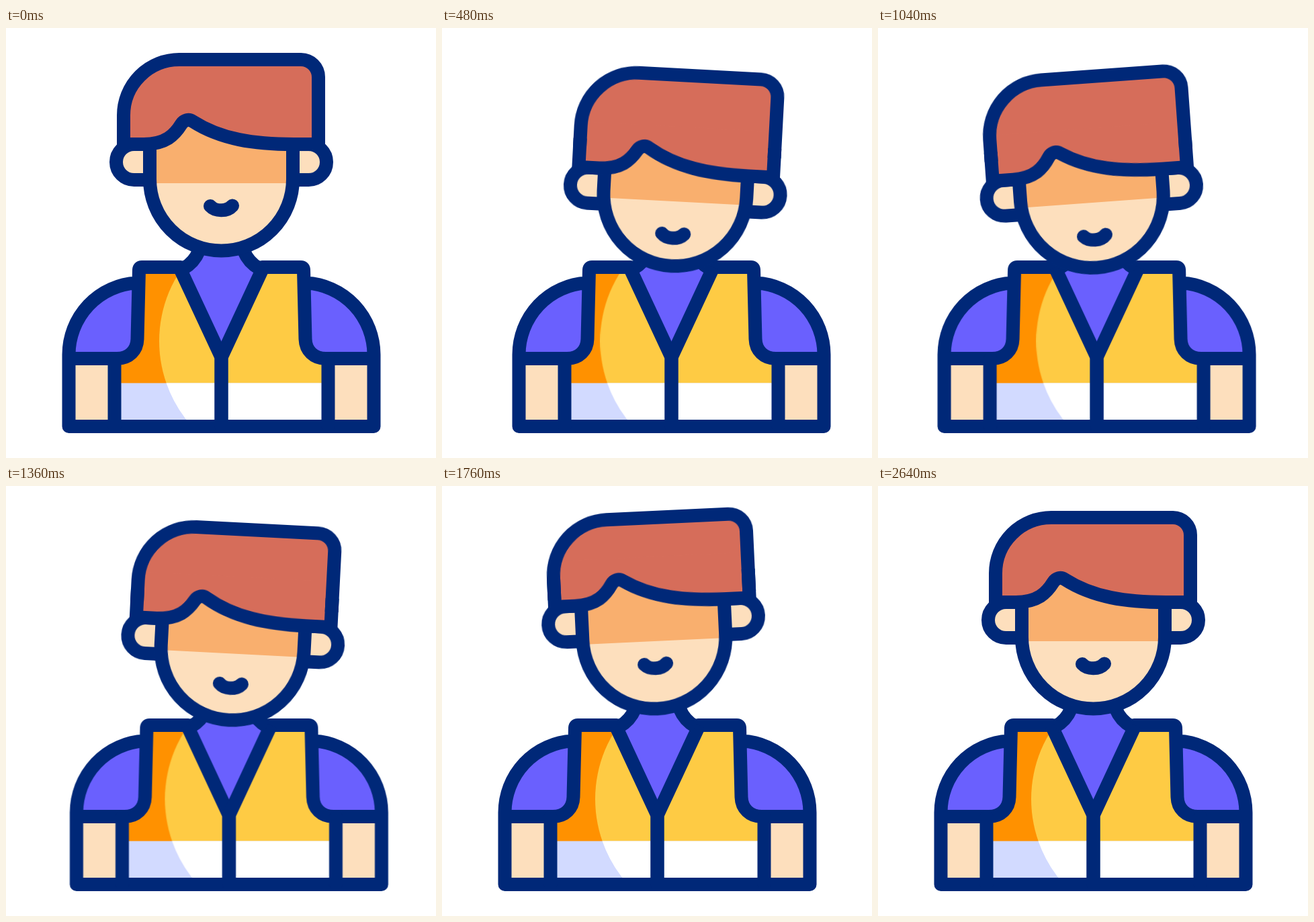
An HTML page that plays this animation: 640x640 px, repeating every 3.04 s.

```html
<!DOCTYPE html>
<html lang="en">
<head>
<meta charset="utf-8">
<title>Nodding worker</title>
<style>
  html, body { margin: 0; width: 100%; height: 100%; overflow: hidden; background: #fff; }
  svg { display: block; width: 100%; height: 100%; }

  .line { fill: none; stroke: #002878; stroke-width: 20; }
  .round { stroke-linejoin: round; stroke-linecap: round; }
  .skin { fill: #fddfbd; }
  .tan { fill: #f9af6e; }
  .hair { fill: #d66d5a; }
  .shirt { fill: #6a60fe; }
  .yellow { fill: #fecb44; }
  .orange { fill: #ff9100; }
  .lilac { fill: #d2daff; }
  .white { fill: #fff; }

  .sway, .still, .nod, .tilt, .dip, .shade, .glow {
    animation: 3040ms cubic-bezier(.333, 0, .667, 1) infinite;
  }
  .sway { --k: 1px; animation-name: sway; }
  .still { --k: -1px; animation-name: sway; }
  .nod { animation-name: nod; }
  .dip { animation-name: dip; }
  .tilt { animation-name: tilt; transform-origin: 320.5px 326px; }
  .shade { animation-name: shade; }
  .glow { animation-name: glow; }

  @keyframes sway {
    0%, 2.632%, 55.263%, 100% { transform: translateX(0); }
    15.789% { transform: translateX(calc(21 * var(--k))); }
    27.632% { transform: translateX(calc(-4 * var(--k))); }
    40.789% { transform: translateX(calc(14 * var(--k))); }
  }
  @keyframes nod {
    0%, 55.263%, 100% { transform: translateY(0); }
    11.842% { transform: translateY(30.7px); }
    23.684% { transform: translateY(.5px); }
    36.842% { transform: translateY(28px); }
  }
  /* front features travel further than the head itself */
  @keyframes dip {
    0%, 23.684%, 55.263%, 100% { transform: translateY(0); }
    11.842% { transform: translateY(25.4px); }
    36.842% { transform: translateY(21px); }
  }
  @keyframes tilt {
    0%, 6.579%, 86.842%, 100% { transform: rotate(0deg); }
    19.737% { transform: rotate(3.9deg); }
    32.895% { transform: rotate(-4.35deg); }
    46.053% { transform: rotate(3.15deg); }
    59.211% { transform: rotate(-2.85deg); }
    72.368% { transform: rotate(2.1deg); }
  }
  @keyframes shade {
    0%, 56.579%, 100% { transform: translateY(0); }
    18.421%, 25% { transform: translateY(4.5px); }
  }
  @keyframes glow {
    0%, 56.579%, 100% { transform: translateX(0); }
    11.842%, 32.895% { transform: translateX(7.4px); }
    44.737% { transform: translateX(8.5px); }
  }
</style>
</head>
<body>
<svg viewBox="0 0 640 640">
  <defs>
    <clipPath id="vest">
      <path d="M198 356H258L320.5 490L383 356H443L445.5 463C446 480 458 492 476 492H480V593H161V492H165C183 492 195 480 195.5 463Z"/>
    </clipPath>
    <g id="side">
      <path class="skin" d="M93.5 492H161V593H93.5Z"/>
      <path class="shirt" d="M93.5 492V486A106 107 0 0 1 198 379L195.5 463C195 480 183 492 165 492Z"/>
    </g>
    <g id="seams" class="line round">
      <path d="M194 379.5A106 107 0 0 0 93.5 486V593H320.5M93.5 492H165C183 492 195 480 195.5 463L198 360Q198 356 202 356H260"/>
      <path d="M161.5 492V593"/>
      <path d="M258 356L320.5 490V593" stroke-linecap="butt"/>
      <path d="M264 358Q280 349 287 332" stroke-linecap="butt"/>
    </g>
    <g id="ear">
      <path class="skin" d="M214 173H190.5A26.5 26.5 0 0 0 190.5 226H214Z"/>
      <path class="line" d="M214 173H190.5A26.5 26.5 0 0 0 190.5 226H214"/>
    </g>
  </defs>

  <g class="sway">
    <path class="shirt" d="M260 356Q280 349 287 330H354Q361 349 381 356L320.5 490Z"/>
    <use href="#side"/>
    <use href="#side" transform="matrix(-1 0 0 1 641 0)"/>
    <g clip-path="url(#vest)">
      <path class="orange" d="M150 340H490V529H150Z"/>
      <g class="still"><circle class="glow yellow" cx="418" cy="466" r="190"/></g>
      <path class="lilac" d="M150 528.5H490V600H150Z"/>
      <g class="still"><path class="glow white" d="M238.6 528.5H597.4A190 190 0 0 1 238.6 528.5Z"/></g>
    </g>
    <use href="#seams"/>
    <use href="#seams" transform="matrix(-1 0 0 1 641 0)"/>

    <g class="nod"><g class="tilt">
      <g class="dip">
        <use href="#ear"/>
        <use href="#ear" transform="matrix(-1 0 0 1 641 0)"/>
      </g>
      <path class="skin" d="M214 173V225A106.5 106.5 0 0 0 427 225V173Z"/>
      <path class="shade tan" d="M214 128H427V231H214Z"/>
      <path class="line" d="M214 173V225A106.5 106.5 0 0 0 427 225V173"/>
      <path class="dip line round" d="M304 265C312 273.5 329 273.5 337 264.5"/>

      <path class="hair" d="M175 137V130A83 83 0 0 1 258 47H439A26 26 0 0 1 465 73V137Z"/>
      <g class="dip">
        <path class="hair" d="M180 105V173H205C238 173 251 159 261 143C265 137 272 135 278 139C320 166 370 173 428 173H465V105Z"/>
        <path class="line" d="M175 130V173H205C238 173 251 159 261 143C265 137 272 135 278 139C320 166 370 173 428 173H465V130"/>
      </g>
      <path class="line" d="M175 163V130A83 83 0 0 1 258 47H439A26 26 0 0 1 465 73V163"/>
    </g></g>
  </g>
</svg>
</body>
</html>
```
